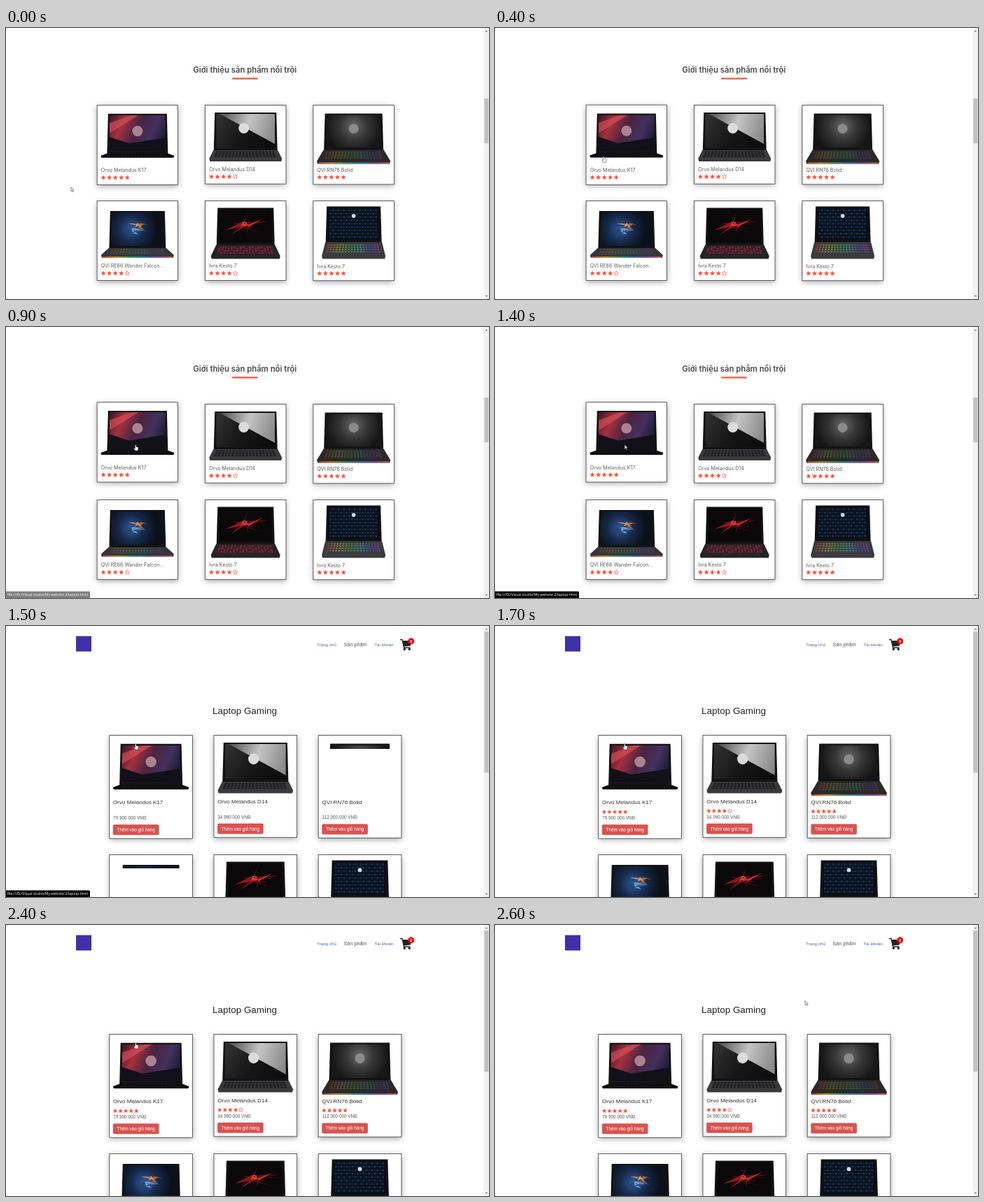
Write an HTML page with a canvas that moves like this. It is 690 px wide and 388 px high and loops after 2.7 s.

```html
<!DOCTYPE html>
<html lang="vi">
<head>
<meta charset="utf-8">
<title>Laptop Gaming</title>
<style>
html, body { margin: 0; width: 100%; height: 100%; overflow: hidden; background: #fff; }
canvas { display: block; width: 690px; height: 388px; }
</style>
</head>
<body>
<canvas id="stage"></canvas>
<script>
const W = 690, H = 388, LOOP = 2700, STEP = 100;
const canvas = document.getElementById('stage');
const c = canvas.getContext('2d');
const dpr = window.devicePixelRatio || 1;
canvas.width = W * dpr;
canvas.height = H * dpr;

const SANS = '"Liberation Sans", Arial, sans-serif';
const ROUND = 'Inter, sans-serif';
const ACCENT = '#ff523b';

const clamp = v => Math.max(0, Math.min(1, v));
const smooth = v => { v = clamp(v); return v * v * (3 - 2 * v); };

function random(seed) {
  return () => (seed = seed * 16807 % 2147483647) / 2147483647;
}

function ramp(g, colors) {
  colors.forEach((col, i) => g.addColorStop(i / (colors.length - 1), col));
  return g;
}
const lin = (x0, y0, x1, y1, ...colors) => ramp(c.createLinearGradient(x0, y0, x1, y1), colors);
const radial = (x, y, r, ...colors) => ramp(c.createRadialGradient(x, y, 0, x, y, r), colors);

function rect(fill, x, y, w, h) {
  c.fillStyle = fill;
  c.fillRect(x, y, w, h);
}

function roundRect(fill, x, y, w, h, r) {
  c.fillStyle = fill;
  c.beginPath();
  c.roundRect(x, y, w, h, r);
  c.fill();
}

function trace(pts) {
  c.beginPath();
  for (let i = 0; i < pts.length; i += 2) c.lineTo(pts[i], pts[i + 1]);
  c.closePath();
}

function poly(fill, ...pts) {
  trace(pts);
  c.fillStyle = fill;
  c.fill();
}

function disc(fill, x, y, r) {
  c.fillStyle = fill;
  c.beginPath();
  c.arc(x, y, r, 0, 7);
  c.fill();
}

function text(str, x, y, font, color, align = 'left') {
  c.font = font;
  c.fillStyle = color;
  c.textAlign = align;
  c.fillText(str, x, y);
}

function at(x, y, draw, scale = 1) {
  c.save();
  c.translate(x, y);
  c.scale(scale, scale);
  draw();
  c.restore();
}

function stars(x, y, gap, r, count) {
  c.fillStyle = c.strokeStyle = ACCENT;
  c.lineWidth = 0.7;
  for (let i = 0; i < 5; i++) {
    const pts = [], full = i < count, size = full ? r : r - 0.3;
    for (let k = 0; k < 10; k++) {
      const a = k * Math.PI / 5 - Math.PI / 2, d = k % 2 ? size * 0.48 : size;
      pts.push(x + i * gap + d * Math.cos(a), y + d * Math.sin(a));
    }
    trace(pts);
    if (full) c.fill(); else c.stroke();
  }
}

function card(x, y, w, h) {
  c.save();
  c.shadowColor = 'rgba(0,0,0,.35)';
  c.shadowBlur = 8 * dpr;
  c.shadowOffsetY = 2 * dpr;
  rect('#fff', x, y, w, h);
  c.restore();
  c.strokeStyle = '#222';
  c.lineWidth = 0.7;
  c.strokeRect(x, y, w, h);
}

// Keys in rows that widen from half width w0 to w1.
function keys(y, h, w0, w1, rows, color) {
  const cols = 18;
  for (let r = 0; r < rows; r++) {
    const half = w0 + (w1 - w0) * r / rows, step = half * 2 / cols;
    for (let i = 0; i < cols; i++)
      rect(color(i / cols, r), i * step - half, y + r * h / rows, step * 0.7, h / rows * 0.6);
  }
}

// Thin triangles thrown out from a centre, flattened to the screen.
function shards(seed, n, cx, cy, reach, ...colors) {
  const rnd = random(seed), jitter = () => (rnd() - 0.5) * 9;
  for (let i = 0; i < n; i++) {
    const a = rnd() * 2 * Math.PI, len = reach * (0.3 + 0.7 * rnd());
    poly(colors[i % colors.length], cx + Math.cos(a) * len, cy + Math.sin(a) * len * 0.5,
      cx + jitter(), cy + jitter(), cx + jitter(), cy + jitter());
  }
}

// Screen pictures, drawn in a box of w by h.
function redGlow(w, h) {
  rect(lin(0, 0, w, h * 0.7, '#3d1426', '#a5303f', '#4a2440', '#43305c', '#191833'), 0, 0, w, h);
  poly('rgba(226,84,92,.6)', 0, h * 0.22, w * 0.4, 0, w * 0.52, 0, 0, h * 0.5);
  poly('#121019', 0, h, 0, h * 0.6, w * 0.35, h * 0.78, w, h * 0.62, w, h);
  disc('#a98490', w / 2, h * 0.44, 7.5);
}

function greySplit(w, h) {
  rect(lin(0, 0, w, h, '#333', '#151515', '#0b0b0b'), 0, 0, w, h);
  poly(lin(w * 0.1, 0, w, h * 0.5, '#555', '#c4c4c4', '#8a8a8a'), w * 0.06, 0, w, 0, w, h * 0.88);
  disc('#dcdcdc', w * 0.47, h * 0.42, 7.5);
}

function darkMetal(w, h) {
  rect(radial(w / 2, h * 0.35, w * 0.5, '#686868', '#353535', '#161616'), 0, 0, w, h);
  disc('#8a8a8a', w / 2, h * 0.42, 7);
}

function blueStorm(w, h) {
  rect(radial(w * 0.38, h * 0.5, w * 0.5, '#2b5b9c', '#16294a', '#0c1019'), 0, 0, w, h);
  shards(11, 9, w * 0.4, h * 0.55, 24, '#3f7cc0', '#26456f', '#7ea6cf');
  shards(5, 9, w * 0.52, h * 0.38, 19, '#a9623c', '#6b3d2c', '#d69a62');
}

function redShards(w, h) {
  rect('#0b0809', 0, 0, w, h);
  shards(29, 16, w / 2, h * 0.45, 38, '#8f171d', '#5a1016', '#c9302f');
  shards(8, 6, w / 2, h * 0.45, 16, '#e06a60', '#d53a34');
}

function blueDots(w, h) {
  rect('#090d14', 0, 0, w, h);
  c.translate(w / 2, 0);
  keys(2, h - 3, w / 2 - 2, w / 2 - 2, 9, (u, r) => (r + Math.round(u * 18)) % 2 ? '#153658' : '#0f2238');
  disc('#d5dce2', 0, h * 0.25, 2.8);
}

const rainbow = (light, sat) => u => `hsl(${u * 300},${sat}%,${light}%)`;

// top: gap above the laptop; photo: extra height its picture gives the card.
const products = [
  { name: 'Orvo Melandus K17', price: '79 900 000 VNĐ', rating: 5, art: redGlow,
    top: 12.3, photo: 1.4, w: 105, h: 63, inset: 10.5, lid: 57, deck: '#0b0b0d', key: () => '#1c1c20' },
  { name: 'Orvo Melandus D14', price: '34 990 000 VNĐ', rating: 4, art: greySplit,
    top: 10.5, photo: 0, w: 104, h: 70, inset: 8, lid: 54, deck: '#3a3a3c', key: () => '#151517' },
  { name: 'QVI RN76 Bolid', price: '112 000 000 VNĐ', rating: 5, art: darkMetal,
    top: 12, photo: 0.7, w: 105, h: 72, inset: 11.5, lid: 52, deck: '#2b2928', key: rainbow(27, 28), glow: true },
  { name: 'QVI RE66 Wander Falcon...', rating: 4, art: blueStorm,
    top: 14.5, photo: 1.2, w: 104, h: 67, inset: 13, lid: 53, deck: '#34353a', key: rainbow(30, 22), glow: true },
  { name: 'Ivra Kesto 7', rating: 4, art: redShards,
    top: 10, photo: 1.2, w: 99, h: 73, inset: 9.5, lid: 53, deck: '#252426',
    key: (u, r) => (r + Math.round(u * 18)) % 3 ? '#a22140' : '#5c1c2b' },
  { name: 'Ivra Kesto 7', rating: 5, art: blueDots,
    top: 8, photo: 1.4, w: 91, h: 75, inset: 7, lid: 51, deck: '#3b3a3e', key: rainbow(38, 35) }
];

function laptop({ w, h, inset, lid, deck, key, glow, art }) {
  const half = w / 2, s = half - inset, depth = h - lid, edge = Math.min(4, depth / 2);
  poly('#121214', -s, 0, s, 0, s + 1.5, lid + 1, -s - 1.5, lid + 1);
  at(2 - s, 2, () => {
    c.beginPath();
    c.rect(0, 0, 2 * s - 4, lid - 5);
    c.clip();
    art(2 * s - 4, lid - 5);
  });
  poly(deck, -s - 2, lid, s + 2, lid, half, h - edge, half - 1, h, 1 - half, h, -half, h - edge);
  keys(lid + depth * 0.12, depth * 0.55, s - 2, s + 2, 4, key);
  if (glow) rect(lin(-half, 0, half, 0, '#c23a34', '#c08a2c', '#3f9a50', '#2f78b8', '#8a45a8', '#d0603c'),
    2 - half, h - 2, w - 4, 1.8);
}

function grid(x, y, dx, dy, draw) {
  products.forEach((p, i) => draw(p, x + dx * (i % 3), y + dy * Math.floor(i / 3), i));
}

function scrollbar(top, bottom) {
  rect('#f1f1f1', 682.5, 0, 7.5, H);
  rect('#c1c1c1', 683.3, top, 6, bottom - top);
  poly('#555', 684.8, 5.2, 688, 5.2, 686.4, 3.4);
  poly('#555', 684.8, 383, 688, 383, 686.4, 384.8);
}

function home(t) {
  text('Giới thiệu sản phẩm nổi trội', 341.3, 64, `600 11.3px ${ROUND}`, '#4a4a4a', 'center');
  roundRect(ACCENT, 323, 71.2, 37, 2.3, 1.1);
  const w = 115.5, lift = 2.6 * smooth((t - 300) / 500);
  grid(130.1, 110.4, 154.4, 137.2, (p, x, y, i) => {
    if (i === 0) y -= lift;
    const base = y + 94.5 + p.photo;
    card(x, y, w, 112.8 + p.photo);
    at(x + w / 2, y + p.top, () => laptop(p));
    text(p.name, x + 5.7, base, `7.1px ${ROUND}`, '#5c5c5c');
    stars(x + 9, base + 8, 8.55, 3.7, p.rating);
  });
  scrollbar(101, 165);
}

function cart() {
  c.strokeStyle = '#222';
  c.lineWidth = 1.3;
  c.beginPath();
  c.moveTo(563, 19.5);
  c.lineTo(566, 19.5);
  c.lineTo(568.5, 31);
  c.lineTo(577.5, 31);
  c.stroke();
  poly('#222', 566, 21, 579, 21, 577.8, 28.5, 567.8, 29.5);
  disc('#222', 569.3, 33.2, 1.7);
  disc('#222', 576.3, 33.2, 1.7);
  disc('#f00', 578.7, 21.7, 4.5);
  text('8', 578.7, 23.6, `bold 5.2px ${SANS}`, '#fff', 'center');
}

function header() {
  rect('#4030a8', 100, 14.5, 22, 22);
  text('Trang chủ', 444, 28.6, `6.25px ${SANS}`, '#3f62b5');
  text('Sản phẩm', 482.5, 28.6, `7.25px ${SANS}`, '#555');
  text('Tài khoản', 526.3, 28.6, `6.25px ${SANS}`, '#3f62b5');
  cart();
}

function shop(t) {
  const w = 118.7, loaded = t >= 1600;
  header();
  text('Laptop Gaming', 341, 126, `13.45px ${SANS}`, '#222', 'center');
  grid(147.8, 156.5, 149.2, 171, (p, x, y, i) => {
    const late = !loaded && (i === 2 || i === 3);
    card(x, y, w, 146.3 + p.photo);
    c.save();
    c.beginPath();
    c.rect(x, y, w, late ? 19.5 : 100);
    c.clip();
    at(x + w / 2, y + p.top, () => laptop(p), 1.035);
    c.restore();
    if (!p.price) return;
    const tx = x + 5.3, ty = y + p.photo;
    text(p.name, tx, ty + 97.5, `8.05px ${SANS}`, '#333');
    if (loaded) stars(tx + 3, ty + 108.3, 7.55, 3.4, p.rating);
    text(p.price, tx, ty + 119.1, `6.4px ${SANS}`, '#555');
    roundRect('#d9534f', tx - 0.2, ty + 126.3, 65.6, 15, 2);
    text('Thêm vào giỏ hàng', tx + 32.6, ty + 136, `6.35px ${SANS}`, '#fff', 'center');
  });
  scrollbar(8, 210);
}

function status(t) {
  if (t < 900 || t >= 1700) return;
  c.globalAlpha = clamp((t - 800) / 200);
  roundRect('#000', 0, 378.5, 120, 9.5, [0, 1.5, 0, 0]);
  c.globalAlpha = 1;
  text('file:///D:/Visual studio/My website 2/laptop.html', 2, 385.2, '5.17px "Open Sans", sans-serif', '#fff');
}

function outlined(...pts) {
  trace(pts);
  c.lineJoin = 'round';
  c.lineWidth = 0.55;
  c.strokeStyle = '#333';
  c.fillStyle = '#fff';
  c.fill();
  c.stroke();
}

const arrow = () => outlined(0, 0, 0, 6, 1.4, 4.8, 2.4, 7, 3.4, 6.5, 2.5, 4.4, 4.3, 4.3);
const hand = () => outlined(-0.7, 0.3, 0, 0, 0.7, 0.3, 0.8, 2.7, 3, 3.2, 3.9, 3.9, 3.7, 6.3,
  3, 8.4, -0.6, 8.4, -2.5, 5.6, -2.3, 4.7, -0.8, 5.2);

function cursor(t) {
  if (t >= 2600) return at(443, 108.3, arrow);
  const k = smooth(t / 600);
  const x = 92.8 + 84.4 * k + 8 * smooth((t - 600) / 200), y = 227.7 - 59 * k;
  at(x, y, t < 400 || t === 1400 ? arrow : hand);
}

const start = performance.now();

function frame() {
  const t = Math.floor((performance.now() - start) % LOOP / STEP) * STEP;
  c.setTransform(dpr, 0, 0, dpr, 0, 0);
  rect('#fff', 0, 0, W, H);
  if (t < 1500) home(t); else shop(t);
  status(t);
  cursor(t);
  requestAnimationFrame(frame);
}

frame();
</script>
</body>
</html>
```
